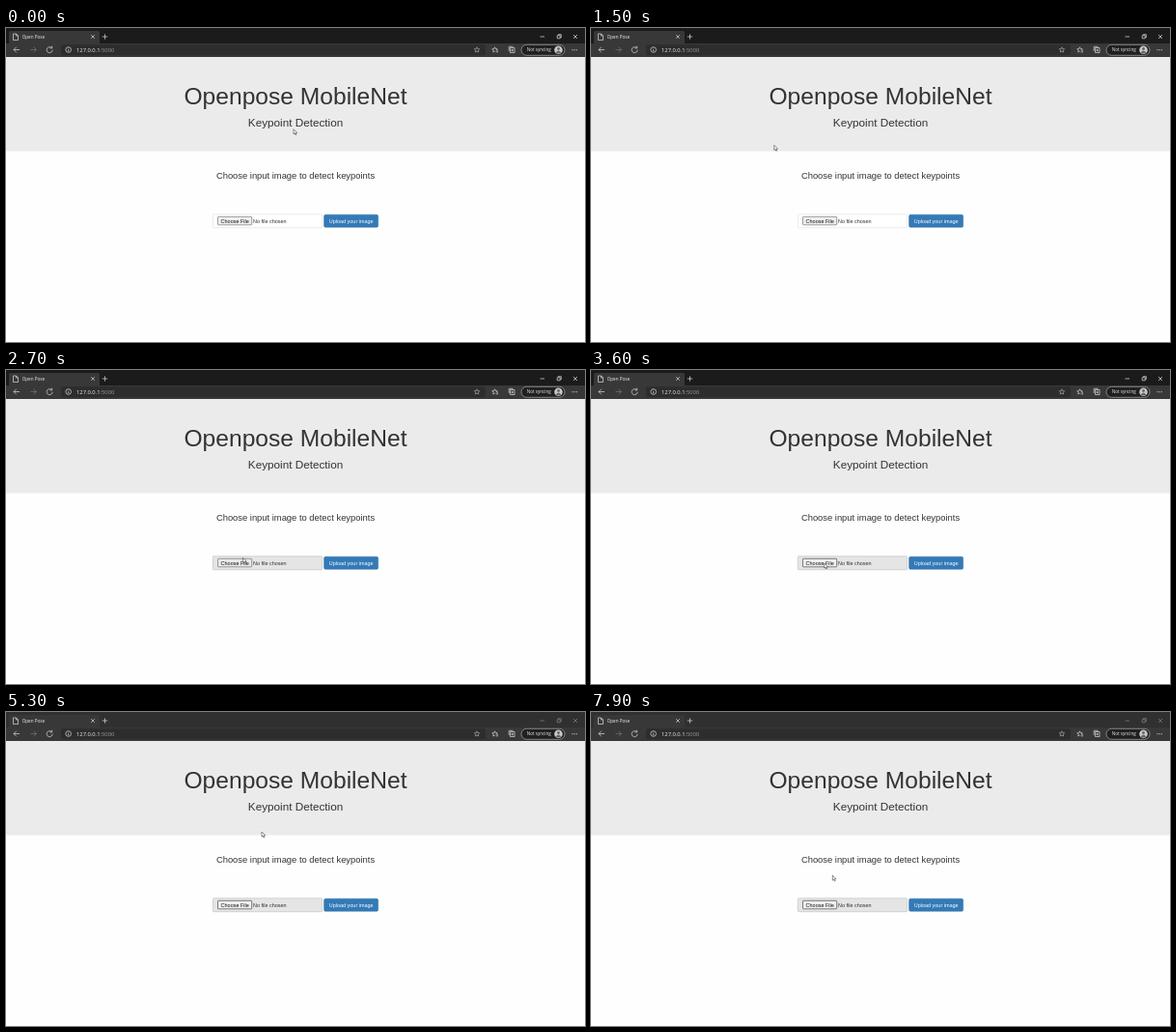
An HTML page that plays this animation: 600x325 px, repeating every 8 s.

```html
<!DOCTYPE html>
<html lang="en">
<head>
<meta charset="utf-8">
<title>Open Pose</title>
<style>
  html, body { margin: 0; width: 100%; height: 100%; overflow: hidden; background: #fefefe; }
  svg { display: block; width: 600px; height: 325px; }
  text { font-family: "Liberation Sans", Arial, sans-serif; fill: #333; }
  .mid { text-anchor: middle; }
  .small { font-size: 5.47px; }
  .ui { font-family: "Open Sans", "Noto Sans", sans-serif; fill: #eee; }
  .icon { fill: none; stroke: #ddd; stroke-width: .7; }
  #strip { fill: #1b1b1b; }
  #controls { stroke: #e4e4e4; }
  #field { fill: #fff; stroke: #e2e2e2; }
  #choose { fill: #efefef; stroke: #767676; }
  .hover #field { fill: #e5e5e5; stroke: #c4c4c4; }
  .hover #choose { fill: #e9e9e9; }
  .focus #choose { fill: #efefef; stroke: #4a4a4a; }
  .inactive #strip { fill: #303030; }
  .inactive #controls { stroke: #858585; }
</style>
</head>
<body>
<svg id="stage" viewBox="0 0 600 325">
  <rect id="strip" width="600" height="17"/>
  <path d="M3 16V4.500Q3 3 4.500 3H95.500Q97 3 97 4.500V16H600V30H0V16Z" fill="#383838"/>
  <rect x="57" y="17.300" width="440" height="11" rx="2" fill="#2d2d2d"/>

  <!-- tab, navigation and toolbar icons -->
  <g class="icon">
    <path d="M7.500 6H10.500L12.500 8V12.500H7.500ZM10.500 6V8H12.500"/>
    <path d="M88.200 7.200L91.800 10.800M91.800 7.200L88.200 10.800M99.800 9H105.200M102.500 6.300V11.700"/>
    <path d="M14 22.500H8M10.800 19.700L8 22.500L10.800 25.300"/>
    <path d="M25.500 22.500H31.500M28.700 19.700L31.500 22.500L28.700 25.300" stroke="#777"/>
    <path d="M47.300 20.500A3 3 0 1 0 48.200 22.700M47.700 18.700V20.900H45.500"/>
    <circle cx="64.700" cy="22.500" r="2.800"/>
    <path d="M64.700 22V24.300M64.700 20.600V21.200"/>
    <path id="star" d="M488 19.800L488.800 21.600L490.700 21.800L489.300 23.100L489.700 25L488 24L486.300 25L486.700 23.100L485.300 21.800L487.200 21.600Z" stroke="#aaa"/>
    <path d="M506.500 19.800L507.300 21.600L509.200 21.800L507.800 23.100M506.500 24L504.800 25L505.200 23.100L503.800 21.800L505.700 21.600L506.500 19.800M507.500 24.800H510M508.500 23.300H510"/>
    <path d="M522.500 20.500H527V25.500H522.500ZM521.200 24V19.300H525.500M524.700 21.700V24.300M523.400 23H526"/>
    <rect x="534" y="17.300" width="45" height="11" rx="5.500" fill="#202020" stroke="#aaa"/>
    <g id="controls">
      <path d="M553.500 9H558"/>
      <path d="M571.200 7.800H574.200V10.800H571.200ZM572.300 7.600V6.700H575.300V9.700H574.400"/>
      <path d="M588 7L592 11M592 7L588 11"/>
    </g>
  </g>
  <circle cx="572.500" cy="22.700" r="4.300" fill="#c9c9c9"/>
  <circle cx="572.500" cy="21.500" r="1.400" fill="#666"/>
  <path d="M569.700 25.400Q572.500 21.700 575.300 25.400Q572.500 27.500 569.700 25.400" fill="#666"/>
  <path d="M586.500 22.700H592" stroke="#ddd" stroke-width="1" stroke-dasharray="1 1.200"/>
  <text class="ui" x="16.700" y="10.800" font-size="4.600">Open Pose</text>
  <text class="ui" x="73" y="24.700" font-size="5.800">127.0.0.1<tspan fill="#999">:5000</tspan></text>
  <text class="ui" x="539.700" y="24.300" font-size="4.600">Not syncing</text>

  <!-- page -->
  <rect y="30" width="600" height="97.500" fill="#ebebeb"/>
  <text class="mid" x="300" y="79.300" font-size="24.600">Openpose MobileNet</text>
  <text class="mid" x="300" y="102.400" font-size="11.720">Keypoint Detection</text>
  <text class="mid" x="300" y="155.700" font-size="9.380">Choose input image to detect keypoints</text>
  <rect id="field" x="214.400" y="192.800" width="113.200" height="13.900" rx=".8" stroke-width=".7"/>
  <rect id="choose" x="219.500" y="195.300" width="35.200" height="8.500" rx=".7" stroke-width=".7"/>
  <text class="mid small" x="237.200" y="201.500" style="fill:#111">Choose File</text>
  <text class="small" x="256" y="201.500">No file chosen</text>
  <rect x="329.600" y="193.200" width="56" height="13" rx="1.500" fill="#337ab7" stroke="#2e6da4" stroke-width=".5"/>
  <text class="mid small" x="357.700" y="201.500" style="fill:#fff">Upload your image</text>

  <path id="cursor" d="M0 0V5.200L1.200 4.100L2 6L2.900 5.600L2.100 3.800H3.700Z" fill="#fff" stroke="#333" stroke-width=".55"/>
</svg>
<script>
  const LOOP = 8000, STEP = 100;
  const stage = document.getElementById("stage");
  const cursor = document.getElementById("cursor");

  // Pointer stops: time, x, y
  const stops = [
    [0, 298, 104.7], [900, 189.8, 121.3], [1500, 189.8, 121.3],
    [1800, 205, 306], [2000, 224, 321], [2700, 245.5, 194.3],
    [3200, 241.8, 200], [4400, 241.8, 200], [5100, 265, 124],
    [6800, 265, 124], [7900, 250.3, 169], [8000, 250.3, 169]
  ];

  function pointerAt(t) {
    const i = stops.findIndex(stop => stop[0] > t);
    const [t0, x0, y0] = stops[i - 1], [t1, x1, y1] = stops[i];
    const p = (t - t0) / (t1 - t0), ease = p * p * (3 - 2 * p);
    return [x0 + (x1 - x0) * ease, y0 + (y1 - y0) * ease];
  }

  function draw() {
    const now = performance.now() % LOOP;
    const t = Math.floor(now / STEP) * STEP;
    cursor.setAttribute("transform", `translate(${pointerAt(t)})`);
    stage.classList.toggle("hover", t >= 2600);
    stage.classList.toggle("focus", t >= 3400);
    stage.classList.toggle("inactive", t >= 3700);
    requestAnimationFrame(draw);
  }
  draw();
</script>
</body>
</html>
```
